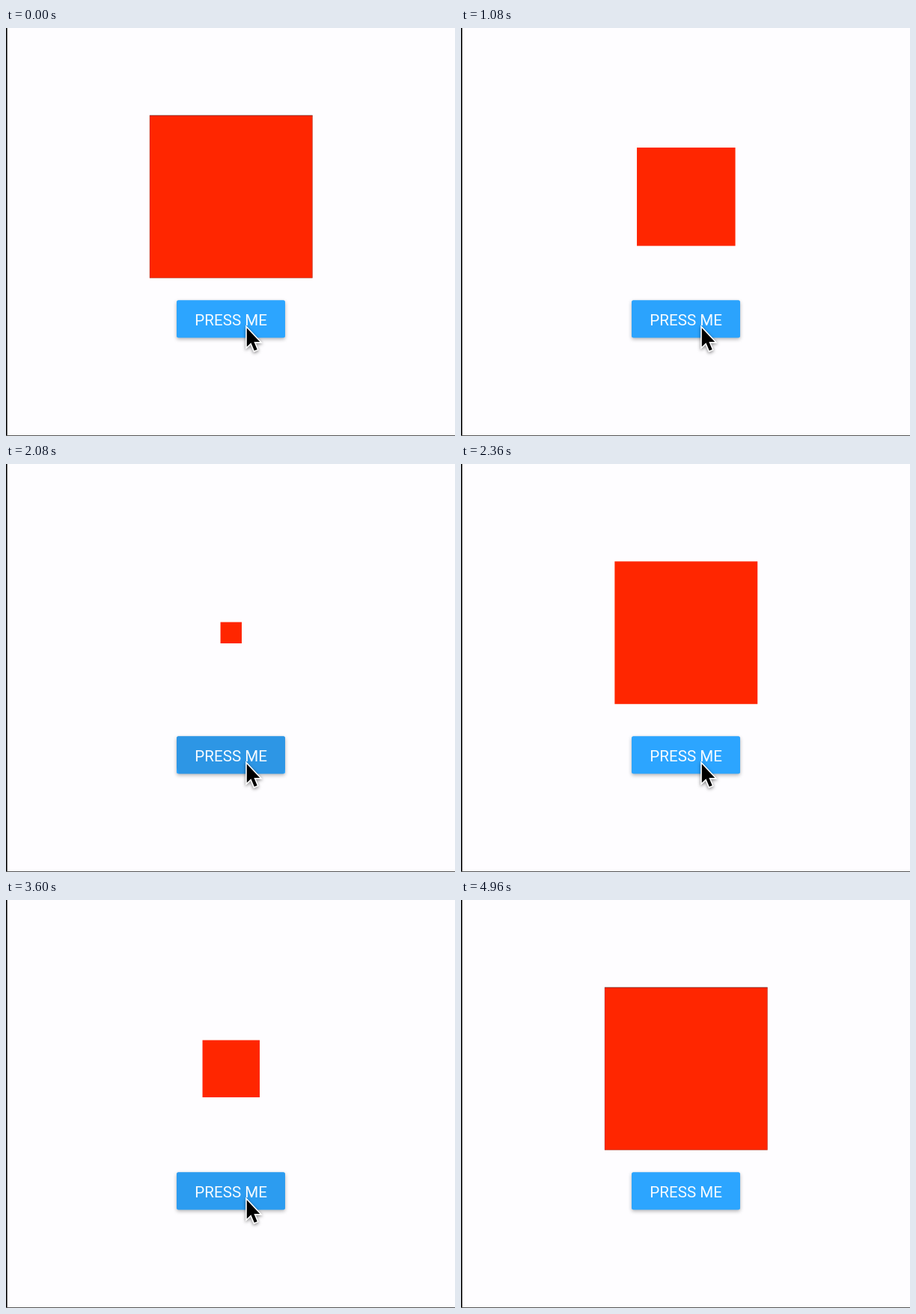
These frames come from a looping animation (600x546 px, 5200 ms). An HTML page with a canvas:

```html
<!DOCTYPE html>
<html lang="en">
<head>
<meta charset="utf-8">
<title>Press me</title>
<style>
  html, body { margin: 0; width: 100%; height: 100%; overflow: hidden; background: #fefdff; }
  canvas { display: block; }
</style>
</head>
<body>
<canvas id="stage" width="600" height="546"></canvas>
<script>
const ctx = document.getElementById('stage').getContext('2d');
const LOOP = 5200, STEP = 40, GROW = 500;
const RED = '#ff2600', BLUE = '#2ca5ff';
// Each press: when the ripple begins and when the square restarts.
const presses = [
  { down: 712, grow: 797 },
  { down: 1885, grow: 1968 },
  { down: 3310, grow: 3398 }
];
const button = { x: 228, y: 364.3, w: 145, h: 50.2, r: 2.5 };

const clamp = v => Math.min(1, Math.max(0, v));
const mix = (a, b, p) => a + (b - a) * p;

// cubic-bezier(.42, 0, 1, 1), solved by bisection
function easeIn(x) {
  let lo = 0, hi = 1;
  for (let i = 0; i < 24; i++) {
    const s = (lo + hi) / 2, q = 1 - s;
    if (1.26 * s * q * q + 3 * s * s * q + s * s * s < x) lo = s; else hi = s;
  }
  return lo * lo * (3 - 2 * lo);
}
const easeInOut = p => p < 0.5 ? easeIn(2 * p) / 2 : 1 - easeIn(2 - 2 * p) / 2;

function squareScale(t) {
  let scale = 1;
  for (const p of presses) {
    if (t >= p.grow) scale = easeInOut(clamp((t - p.grow) / GROW));
  }
  return scale > 0.988 ? 1 : scale;
}

function drawSquare(scale) {
  const side = 217.6 * scale;
  if (side < 0.5) return;
  const x = 300.8 - side / 2, y = 225.8 - side / 2;
  ctx.fillStyle = RED;
  ctx.fillRect(x, y, side, side);
  if (scale === 1) {
    ctx.strokeStyle = 'rgba(70, 40, 40, 0.4)';
    ctx.lineWidth = 0.6;
    ctx.strokeRect(x, y, side, side);
    ctx.fillStyle = 'rgba(70, 10, 0, 0.45)';
    ctx.fillRect(x, 116.6, side, 0.9);
  }
}

function drawRipple(t) {
  if (t < 800) return;
  for (const p of presses) {
    const age = t - p.down;
    if (age < 0 || age > 390) continue;
    const spread = 1 - (1 - clamp(age / 225)) ** 1.6;
    const alpha = clamp(age / 75) * (1 - clamp((age - 225) / 160));
    ctx.fillStyle = `rgba(48, 120, 180, ${0.34 * alpha})`;
    ctx.beginPath();
    ctx.arc(mix(309, 300.5, spread), mix(380, 386, spread), mix(38, 77, spread), 0, 7);
    ctx.fill();
  }
}

function buttonPath() {
  ctx.beginPath();
  ctx.roundRect(button.x, button.y, button.w, button.h, button.r);
}

function drawButton(t) {
  ctx.save();
  ctx.shadowColor = 'rgba(0, 0, 0, 0.3)';
  ctx.shadowBlur = 5;
  ctx.shadowOffsetY = 2;
  ctx.fillStyle = BLUE;
  buttonPath();
  ctx.fill();
  ctx.restore();

  ctx.save();
  buttonPath();
  ctx.clip();
  drawRipple(t);
  ctx.restore();

  ctx.fillStyle = '#f6fbff';
  ctx.font = '20.6px Roboto, sans-serif';
  ctx.textAlign = 'center';
  ctx.fillText('PRESS ME', 300.6, 398);
}

function drawCursor(t) {
  if (t >= 4240) return;
  const p = clamp((t - 4040) / 160) ** 2;
  ctx.save();
  ctx.translate(mix(321, 67, p), mix(400.5, 396, p));
  ctx.beginPath();
  [[0.8, 1], [0.8, 26], [6.4, 20.8], [10.8, 31.3], [14.7, 29.7], [10.4, 19.6], [18.2, 19.6]]
    .forEach(([x, y]) => ctx.lineTo(x, y));
  ctx.closePath();
  ctx.lineWidth = 3.2;
  ctx.strokeStyle = '#fff';
  ctx.shadowColor = 'rgba(0, 0, 0, 0.5)';
  ctx.shadowBlur = 4;
  ctx.shadowOffsetY = 1.5;
  ctx.stroke();
  ctx.shadowColor = 'transparent';
  ctx.fillStyle = '#000';
  ctx.fill();
  ctx.restore();
}

function draw(t) {
  ctx.fillStyle = '#fefdff';
  ctx.fillRect(0, 0, 600, 546);
  drawSquare(squareScale(t));
  drawButton(t);
  drawCursor(t);
  ctx.fillStyle = '#000';
  ctx.fillRect(0, 0, 1.6, 546);
  ctx.fillStyle = '#555';
  ctx.fillRect(0, 545, 600, 1);
}

const start = performance.now();
function tick() {
  const t = (performance.now() - start) % LOOP;
  draw(Math.floor(t / STEP) * STEP);
  requestAnimationFrame(tick);
}
tick();
document.fonts.ready.then(() => draw(0));
</script>
</body>
</html>
```
